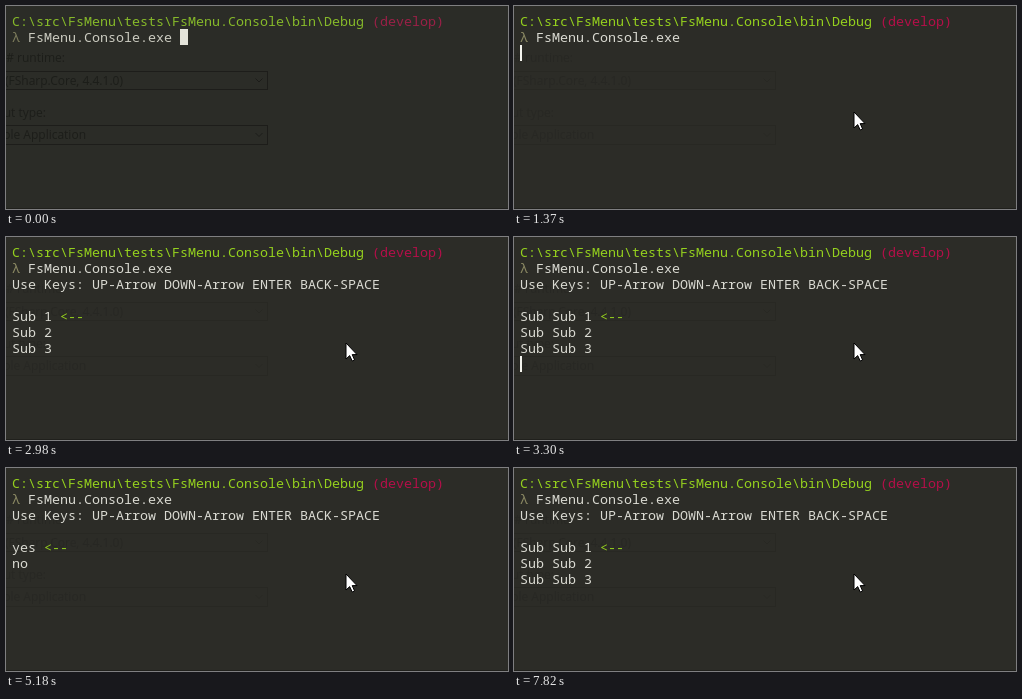
Animation of 502 by 203 pixels, one loop 8000 ms. Source, as an HTML page with a canvas:

```html
<!DOCTYPE html>
<html lang="en">
<head>
<meta charset="utf-8">
<title>Console menu</title>
<style>
  html, body { margin: 0; width: 100%; height: 100%; overflow: hidden; background: #2c2c27; }
  canvas { display: block; width: 502px; height: 203px; }
</style>
</head>
<body>
<canvas id="stage" width="502" height="203"></canvas>
<script>
const ctx = document.getElementById("stage").getContext("2d");
const W = 502, H = 203, LOOP = 8000;
const LEFT = 6, TOP = 7, CELL_W = 8, CELL_H = 16, ASCENT = 13;
const FOCUS_AT = 440;

const IDLE = { back: "#2b2c27", ghost: 0.8, path: "#86b92a", branch: "#9a2047",
               prompt: "#7d7c5c", text: "#cbcbc0", caret: "#e4e4da" };
const ACTIVE = { back: "#2c2c27", ghost: 0.2, path: "#95d11e", branch: "#b40f49",
                 prompt: "#8c8a64", text: "#dadad2", caret: "#f4f4ee" };

const MENUS = {
  main: ["Item 1", "Item 2"],
  sub: ["Sub 1", "Sub 2", "Sub 3"],
  subSub: ["Sub Sub 1", "Sub Sub 2", "Sub Sub 3"],
  confirm: ["yes", "no"]
};

// Each entry: start time, menu, selected item
const SCREENS = [
  [1520, "main", 0], [2290, "main", 1], [2520, "sub", 0],
  [3300, "subSub", 0], [4400, "subSub", 1],
  [4630, "confirm", 0], [5710, "confirm", 1], [5940, "confirm", 0],
  [6190, "subSub", 0]
];

// Spans with the caret lit: from, to, row
const CARET = [
  [440, 990, 1], [1370, 1520, 2], [1520, 2060, 6], [2520, 2980, 7],
  [3300, 3850, 7], [4400, 4630, 7], [4630, 5180, 6], [5710, 6190, 6],
  [6190, 6720, 7], [7270, 7820, 7]
];

// Pointer steps: it comes up from below, then rests
const MOVE_TIMES = [70, 140, 220, 290, 370];
const REST = { x: 340, y: 106 };

function print(str, col, row, color) {
  ctx.font = '13.333px "Noto Sans Mono", "DejaVu Sans Mono", monospace';
  ctx.textAlign = "left";
  ctx.fillStyle = color;
  [...str].forEach((ch, i) => {
    if (ch !== " ") ctx.fillText(ch, LEFT + (col + i) * CELL_W, TOP + row * CELL_H + ASCENT);
  });
}

function drawCombo(top, height) {
  ctx.strokeRect(-5.5, top + 0.5, 267, height);
  const y = top + height / 2;
  ctx.beginPath();
  ctx.moveTo(249.5, y - 1.5);
  ctx.lineTo(253, y + 2);
  ctx.lineTo(256.5, y - 1.5);
  ctx.stroke();
}

// The form shining faintly through the window
function drawGhost(alpha) {
  ctx.save();
  ctx.globalAlpha = alpha;
  ctx.fillStyle = ctx.strokeStyle = "#191a17";
  ctx.lineWidth = 1;
  ctx.font = '12px "Open Sans", "Noto Sans", sans-serif';
  ctx.textAlign = "right";
  ctx.fillText("Target F# runtime:", 59, 56);
  ctx.fillText("F# 4.1 (FSharp.Core, 4.4.1.0)", 117, 79);
  ctx.fillText("Output type:", 40, 111);
  ctx.fillText("Console Application", 80, 133);
  drawCombo(65, 18);
  drawCombo(119, 19);
  ctx.restore();
}

function drawMenu(t) {
  const screen = SCREENS.filter(s => t >= s[0]).pop();
  if (!screen) return;
  print("Use Keys: UP-Arrow DOWN-Arrow ENTER BACK-SPACE", 0, 2, ACTIVE.text);
  const items = MENUS[screen[1]];
  const arrowCol = Math.max(...items.map(s => s.length)) + 1;
  items.forEach((item, i) => {
    print(item, 0, 4 + i, ACTIVE.text);
    if (i === screen[2]) print("<--", arrowCol, 4 + i, ACTIVE.path);
  });
}

function drawCaret(t, look) {
  ctx.fillStyle = look.caret;
  if (t < FOCUS_AT) {
    ctx.fillRect(174, TOP + CELL_H, CELL_W, CELL_H);
    return;
  }
  const span = CARET.find(([from, to]) => t >= from && t < to);
  if (!span) return;
  const row = span[2];
  ctx.fillRect(row === 1 ? 174 : LEFT, TOP + row * CELL_H, 2, CELL_H);
}

function drawPointer(t) {
  const step = MOVE_TIMES.filter(m => t >= m).length;
  if (!step) return;
  const away = (1 - step / MOVE_TIMES.length) ** 1.6;
  ctx.save();
  ctx.translate(Math.round(REST.x + 18 * away), Math.round(REST.y + 125 * away));
  const outline = [[0, 0], [0, 16], [3.7, 12.6], [6.2, 18], [8.6, 17], [6.2, 11.6], [11, 11.6]];
  ctx.beginPath();
  outline.forEach(([x, y]) => ctx.lineTo(x, y));
  ctx.closePath();
  ctx.fillStyle = "#fff";
  ctx.fill();
  ctx.strokeStyle = "#000";
  ctx.lineWidth = 1;
  ctx.stroke();
  ctx.restore();
}

function draw(t) {
  const look = t < FOCUS_AT ? IDLE : ACTIVE;
  ctx.fillStyle = look.back;
  ctx.fillRect(0, 0, W, H);
  drawGhost(look.ghost);
  ctx.fillStyle = "#20201c";
  ctx.fillRect(0, H - 1, W, 1);
  print("C:\\src\\FsMenu\\tests\\FsMenu.Console\\bin\\Debug", 0, 0, look.path);
  print("(develop)", 45, 0, look.branch);
  print("λ", 0, 1, look.prompt);
  print("FsMenu.Console.exe", 2, 1, look.text);
  drawMenu(t);
  drawCaret(t, look);
  drawPointer(t);
}

const start = performance.now();
function tick() {
  draw((performance.now() - start) % LOOP);
  requestAnimationFrame(tick);
}
tick();
</script>
</body>
</html>
```
